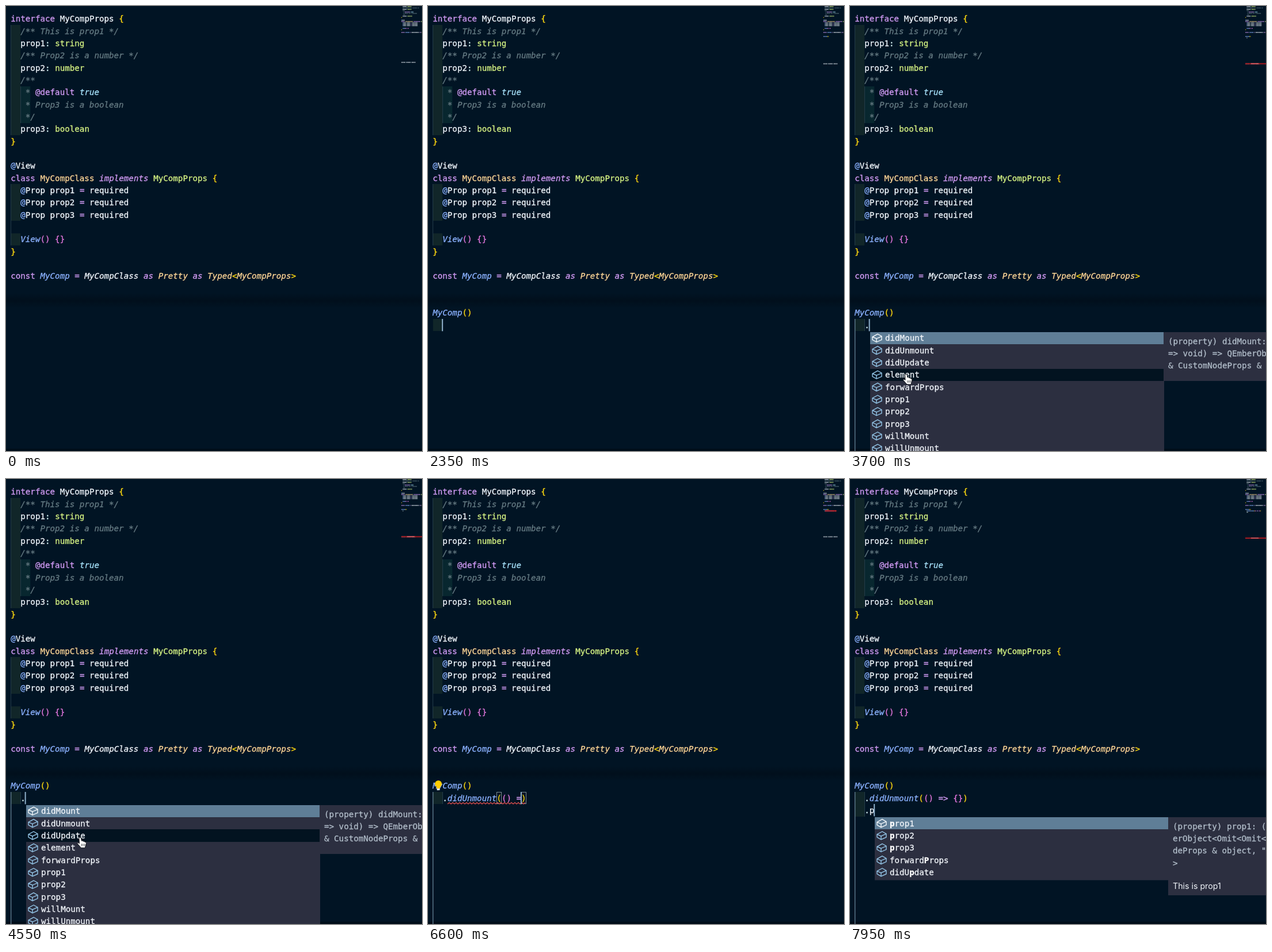
An HTML page with a canvas for the animation above (8 s loop, 723 by 775 pixels).

```html
<!DOCTYPE html>
<html lang="en">
<head>
<meta charset="utf-8">
<title>Typed component in an editor</title>
<style>
html, body { margin: 0; width: 100%; height: 100%; overflow: hidden; background: #011424; }
canvas { display: block; width: 723px; height: 775px; }
</style>
</head>
<body>
<canvas id="stage" width="723" height="775"></canvas>
<script>
const ctx = document.getElementById("stage").getContext("2d");
const W = 723, H = 775, LOOP = 8000;
const LEFT = 8.2, ROW = 64 / 3, CHAR = 8.55, POP_DROP = 1.3;
const FONT = '14.2px "DejaVu Sans Mono", monospace';
const PANEL = "#2c2f40", PICKED = "#5f7e97", ITEM = "#f0f4f9";

// A token starts with ~ and a colour key; an upper-case key means italic.
const COLORS = {
  k: "#d19af3", w: "#f2f6fc", g: "#d5f283", c: "#657a82", y: "#ffd90f",
  o: "#ffd596", b: "#8cb2ff", p: "#e276dc", t: "#a8e2fb", d: "#d6f0f2"
};

const CODE = [
  "~kinterface ~wMyCompProps ~y{",
  "~C  /** This is prop1 */",
  "~w  prop1~d: ~gstring",
  "~C  /** Prop2 is a number */",
  "~w  prop2~d: ~gnumber",
  "~C  /**",
  "~C   * ~k@default ~Ttrue",
  "~C   * Prop3 is a boolean",
  "~C   */",
  "~w  prop3~d: ~gboolean",
  "~y}",
  "",
  "~b@~wView",
  "~kclass ~oMyCompClass ~Kimplements ~gMyCompProps ~y{",
  "~b  @~wProp prop1 ~k= ~wrequired",
  "~b  @~wProp prop2 ~k= ~wrequired",
  "~b  @~wProp prop3 ~k= ~wrequired",
  "",
  "~B  View~p() {}",
  "~y}",
  "",
  "~kconst ~BMyComp ~k= ~WMyCompClass ~Kas ~OPretty ~Kas ~OTyped~Y<~OMyCompProps~Y>"
];

// Each step: time, line 24, line 25, line 26, cursor row, cursor column.
const CALL = "~BMyComp~y()";
const DONE = "~d  .~BdidUnmount~y(~p() ~k=> ~p{}~y)";
const STEPS = [
  [0, "", "", "", -1, 0],
  [950, "~bM", "", "", 24, 1],
  [1450, "~BMyComp", "", "", 24, 6],
  [1850, CALL, "", "", 24, 7],
  [2250, CALL, "", "", 25, 2],
  [2450, CALL, "~d  .", "", 25, 3],
  [4800, CALL, "~d  .didUnmount", "", 25, 13],
  [5150, CALL, "~d  .~BdidUnmount~y()", "", 25, 14],
  [5600, CALL, "~d  .~BdidUnmount~y(~p()~y)", "", 25, 15],
  [5950, CALL, "~d  .~BdidUnmount~y(~p()~y)", "", 25, 16],
  [6250, CALL, "~d  .~BdidUnmount~y(~p() ~y)", "", 25, 17],
  [6500, CALL, "~d  .~BdidUnmount~y(~p() ~k=~y)", "", 25, 18],
  [6750, CALL, "~d  .~BdidUnmount~y(~p() ~k=>~y)", "", 25, 19],
  [6900, CALL, "~d  .~BdidUnmount~y(~p() ~k=> ~y)", "", 25, 20],
  [7050, CALL, DONE, "", 25, 21],
  [7250, CALL, DONE, "", 25, 23],
  [7400, CALL, DONE, "", 26, 2],
  [7650, CALL, DONE, "~d  .", 26, 3],
  [7850, CALL, DONE, "~d  .~wp", 26, 4]
];

const GLOBALS = ("MyComp MyCompClass MIDIAccess MIDIConnectionEvent MIDIInput MIDIInputMap " +
  "MIDIMessageEvent MIDIOutput MIDIOutputMap MIDIPort Map").split(" ");
const MEMBERS = ("didMount didUnmount didUpdate element forwardProps prop1 prop2 prop3 " +
  "willMount willUnmount").split(" ");
const MATCHES = "prop1 prop2 prop3 forwardProps didUpdate".split(" ");

const within = (t, a, b) => t >= a && t < b;
const rowMid = row => 22.3 + row * ROW;
const rowTop = row => Math.round(rowMid(row) - ROW / 2);
const popTop = row => Math.round(rowMid(row) - ROW / 2 + POP_DROP);
const colX = col => LEFT + col * CHAR;

function rect(x, y, w, h, color) {
  ctx.fillStyle = color;
  ctx.fillRect(x, y, w, h);
}

function path(points, color, width = 1.2, close = false) {
  ctx.beginPath();
  points.forEach(([x, y]) => ctx.lineTo(x, y));
  if (close) ctx.closePath();
  ctx.strokeStyle = color;
  ctx.lineWidth = width;
  ctx.stroke();
}

// The thin outline gives the letters a slightly heavier weight.
function text(str, x, mid, color, style = "") {
  const base = Math.round(mid + 5);
  ctx.font = style + " " + FONT;
  ctx.fillStyle = ctx.strokeStyle = color;
  ctx.lineWidth = 0.3;
  ctx.fillText(str, x, base);
  ctx.strokeText(str, x, base);
}

function eachToken(line, use) {
  let col = 0;
  for (const token of line.split("~").slice(1)) {
    const key = token[0], str = token.slice(1), low = key.toLowerCase();
    use(str, col, COLORS[low], key === low ? "" : "italic");
    col += str.length;
  }
}

function codeLine(line, row) {
  eachToken(line, (str, col, color, style) => text(str, colX(col), rowMid(row), color, style));
}

function indent(from, to, col, color) {
  rect(colX(col) + 0.5, rowTop(from), 2 * CHAR - 0.6, rowTop(to + 1) - rowTop(from), color);
}

function guide(from, to, col, color = "#233b49") {
  rect(Math.round(colX(col)), rowTop(from), 1, rowTop(to + 1) - rowTop(from), color);
}

function backdrop() {
  rect(0, 0, W, H, "#011424");
  const band = ctx.createLinearGradient(0, 500, 0, 526);
  band.addColorStop(0, "rgba(0,8,16,0)");
  band.addColorStop(0.5, "rgba(0,8,16,.4)");
  band.addColorStop(1, "rgba(0,8,16,0)");
  rect(0, 500, W, 26, band);
  rect(0, 771, W, 4, "rgba(0,6,14,.5)");
}

function fixedIndents() {
  indent(1, 9, 0, "#112629");
  indent(6, 8, 2, "#08272f");
  indent(14, 16, 0, "#112629");
  indent(18, 18, 0, "#112629");
  guide(1, 9, 0);
  guide(6, 8, 2);
  guide(14, 18, 0);
}

function liveIndents(t) {
  if (t < 2250) return;
  const last = t >= 7400 ? 26 : 25;
  indent(25, last, 0, "#112629");
  if (t < 2450) return;
  guide(25, last, 2);
  rect(8, rowTop(25), 1.3, H, "#647f92");
}

function minimap(t, live) {
  const y = row => 1 + (row - 2) * 2.37, step = 1.18;
  const tail = t >= 7400 ? 45 : t >= 2250 ? 44 : 43;
  const put = (line, row) => eachToken(line, (str, col, color) => {
    [...str].forEach((ch, i) => {
      if (ch !== " ") rect(687 + (col + i) * step, y(row) - 0.8, step, 1.7, color);
    });
  });
  ctx.save();
  ctx.globalAlpha = 0.6;
  CODE.forEach((line, i) => { if (i > 1) put(line, i); });
  live.forEach((line, i) => put(line, 24 + i));
  put("~wexport default MyComp", tail);
  ctx.restore();
  if (within(t, 2750, 5200) || t >= 7750) {
    rect(687, y(tail) - 1, 36, 2, "#a9181f");
    rect(697, y(tail) - 0.8, 13, 1.4, "#df6468");
  }
  if (within(t, 6000, 7150)) rect(690, y(25) - 1, 20, 2, "#c5202a");
}

function cube(x, y, color) {
  path([[x - 8, y - 2], [x + 1, y - 7], [x + 8, y - 3], [x + 8, y + 3], [x - 1, y + 7], [x - 8, y + 3]], color, 1.4, true);
  path([[x - 8, y - 2], [x - 1, y + 1], [x + 8, y - 3]], color, 1.4);
  path([[x - 1, y + 1], [x - 1, y + 7]], color, 1.4);
}

function variable(x, y, color) {
  for (const s of [-1, 1])
    path([[x + s * 5, y - 5], [x + s * 8, y - 5], [x + s * 8, y + 5], [x + s * 5, y + 5]], color, 1.3);
  path([[x - 4.5, y], [x + 1, y - 3], [x + 4.5, y - 1.5], [x + 4.5, y + 1], [x - 1, y + 3.5], [x - 4.5, y + 2]], color, 1.2, true);
  path([[x - 4.5, y], [x - 1, y + 1.2], [x + 4.5, y - 1.5]], color, 1);
}

function classIcon(x, y) {
  const color = "#ee9d28";
  path([[x - 7, y - 2], [x - 2, y - 7], [x + 1, y - 4], [x - 4, y + 1]], color, 1.3, true);
  path([[x - 2, y - 1], [x + 4, y - 1]], color, 1.3);
  path([[x, y - 1], [x, y + 5], [x + 4, y + 5]], color, 1.3);
  for (const dy of [-1, 5])
    path([[x + 3, y + dy], [x + 5.5, y + dy - 2.5], [x + 8, y + dy], [x + 5.5, y + dy + 2.5]], color, 1.2, true);
}

function itemLabel(name, x, mid, match) {
  const at = match ? name.toLowerCase().indexOf(match) : -1;
  text(at < 0 ? name : name.slice(0, at), x, mid, ITEM);
  if (at < 0) return;
  text(name[at], x + at * CHAR, mid, "#fff", "bold");
  text(name.slice(at + 1), x + (at + 1) * CHAR, mid, ITEM);
}

function popup(left, row, items, match, hover = -1) {
  rect(left, popTop(row), 511, items.length * ROW + 3, PANEL);
  items.forEach((name, i) => {
    const mid = rowMid(row + i) + POP_DROP, x = left + 12;
    if (i === 0 || i === hover) {
      const top = popTop(row + i);
      rect(left, top, 510, popTop(row + i + 1) - top, i ? "#021320" : PICKED);
    }
    if (name === "MyCompClass") classIcon(x, mid);
    else if (match === "m") variable(x, mid, "#d3e0ea");
    else cube(x, mid, i ? "#93c4e6" : "#f4f9fc");
    itemLabel(name, left + 26, mid, match);
  });
}

function docs(left, row, lines, height) {
  const top = popTop(row);
  rect(left + 510, top, W, height, PANEL);
  lines.forEach((line, i) => text(line, left + 518, top + 15.6 + i * ROW, "#b1bdc9"));
}

function popups(t, mouse) {
  if (within(t, 1000, 1450)) {
    popup(18, 25, GLOBALS, "m");
    if (t >= 1050) docs(18, 25, ["const MyComp: Typed<MyCompProps>"], 44);
  }
  if (within(t, 2500, 4800)) {
    const hover = mouse ? Math.floor((mouse.y - popTop(26)) / ROW) : -1;
    popup(35, 26, MEMBERS, "", hover);
    if (t >= 2750)
      docs(35, 26, ["(property) didMount: (", "=> void) => QEmberObject", "& CustomNodeProps & "], 85);
  }
  if (within(t, 7700, 7850)) popup(35, 27, MEMBERS, "");
  if (t >= 7850) {
    popup(43, 27, MATCHES, "p");
    docs(43, 27, ["(property) prop1: (", "erObject<Omit<Omit<", 'deProps & object, "', ">"], 136);
    ctx.font = '14.2px Inter, "Liberation Sans", sans-serif';
    ctx.fillStyle = ITEM;
    ctx.fillText("This is prop1", 561, 714);
  }
}

// Pointer stops: time, x, y
const STOPS = [
  [2850, 110, 606], [3100, 97, 641], [4000, 97, 641], [4150, 103, 682],
  [4300, 103, 682], [4700, 140, 598], [4800, 140, 598], [5000, 140, 584], [5150, 140, 584]
];

function pointerAt(t) {
  const i = STOPS.findIndex(stop => stop[0] > t);
  if (i < 1) return null;
  const [ta, xa, ya] = STOPS[i - 1], [tb, xb, yb] = STOPS[i];
  const u = (t - ta) / (tb - ta), e = u * u * (3 - 2 * u);
  return { x: xa + (xb - xa) * e, y: ya + (yb - ya) * e };
}

function hand(x, y) {
  ctx.save();
  ctx.translate(x, y);
  ctx.beginPath();
  ctx.moveTo(-1.5, 1);
  ctx.quadraticCurveTo(0, -1.5, 2, 1);
  ctx.lineTo(3, 6);
  ctx.quadraticCurveTo(5, 4.5, 6, 7);
  ctx.quadraticCurveTo(8, 5.5, 8.5, 8);
  ctx.quadraticCurveTo(11, 7, 11, 10);
  ctx.lineTo(9, 18);
  ctx.lineTo(2, 18);
  ctx.lineTo(-4.5, 10.5);
  ctx.quadraticCurveTo(-4, 8, -1, 10.5);
  ctx.closePath();
  ctx.fillStyle = "#fff";
  ctx.fill();
  ctx.strokeStyle = "#10141a";
  ctx.lineWidth = 1;
  ctx.stroke();
  for (const dx of [3, 5.5, 8]) path([[dx, 11], [dx, 15]], "#10141a", 0.8);
  ctx.restore();
}

function beam(x, y) {
  for (const [color, width] of [["#f4f6f8", 4], ["#0a121a", 1.5]]) {
    for (const s of [-1, 1])
      path([[x - 4, y + s * 9], [x, y + s * 7], [x + 4, y + s * 9]], color, width);
    path([[x, y - 8], [x, y + 8]], color, width);
    path([[x - 3, y + 3], [x + 3, y + 3]], color, width);
  }
}

function lightbulb(x, y) {
  ctx.beginPath();
  ctx.arc(x, y - 2, 6, 0, 7);
  ctx.fillStyle = "#ffcc00";
  ctx.fill();
  rect(x - 3, y + 2, 6, 4, "#ffcc00");
  rect(x - 2.5, y + 6, 5, 3, "#e8edf0");
}

function brackets(t, line) {
  if (!within(t, 5150, 7050)) return;
  const end = line.replace(/~./g, "").length - 1;
  ctx.strokeStyle = "#7d8a91";
  ctx.lineWidth = 1;
  for (const col of [13, end])
    ctx.strokeRect(Math.round(colX(col)) + 0.5, 545.5, 8, 20);
}

function squiggle(t, line) {
  if (!within(t, 6000, 7150)) return;
  const end = colX(line.replace(/~./g, "").length), points = [];
  for (let x = 34, i = 0; x <= end; x += 3, i++) points.push([x, i % 2 ? 563.5 : 566]);
  path(points, "#ef5350", 1.2);
}

function draw(t) {
  const [, a, b, c, row, col] = STEPS.filter(step => step[0] <= t).pop();
  const mouse = pointerAt(t);
  backdrop();
  fixedIndents();
  liveIndents(t);
  CODE.forEach(codeLine);
  [a, b, c].forEach((line, i) => codeLine(line, 24 + i));
  brackets(t, b);
  squiggle(t, b);
  if (within(t, 6150, 7150)) lightbulb(18, 533);
  minimap(t, [a, b, c]);
  popups(t, mouse);
  const blinkOff = within(t, 3350, 3700) || within(t, 4150, 4500);
  if (row > 0 && !blinkOff) rect(colX(col) - 1.2, rowTop(row), 2, ROW, "#8fb0cb");
  if (mouse) (t < 4800 ? hand : beam)(mouse.x, mouse.y);
}

function tick(now) {
  draw(now % LOOP);
  requestAnimationFrame(tick);
}
draw(0);
requestAnimationFrame(tick);
</script>
</body>
</html>
```
